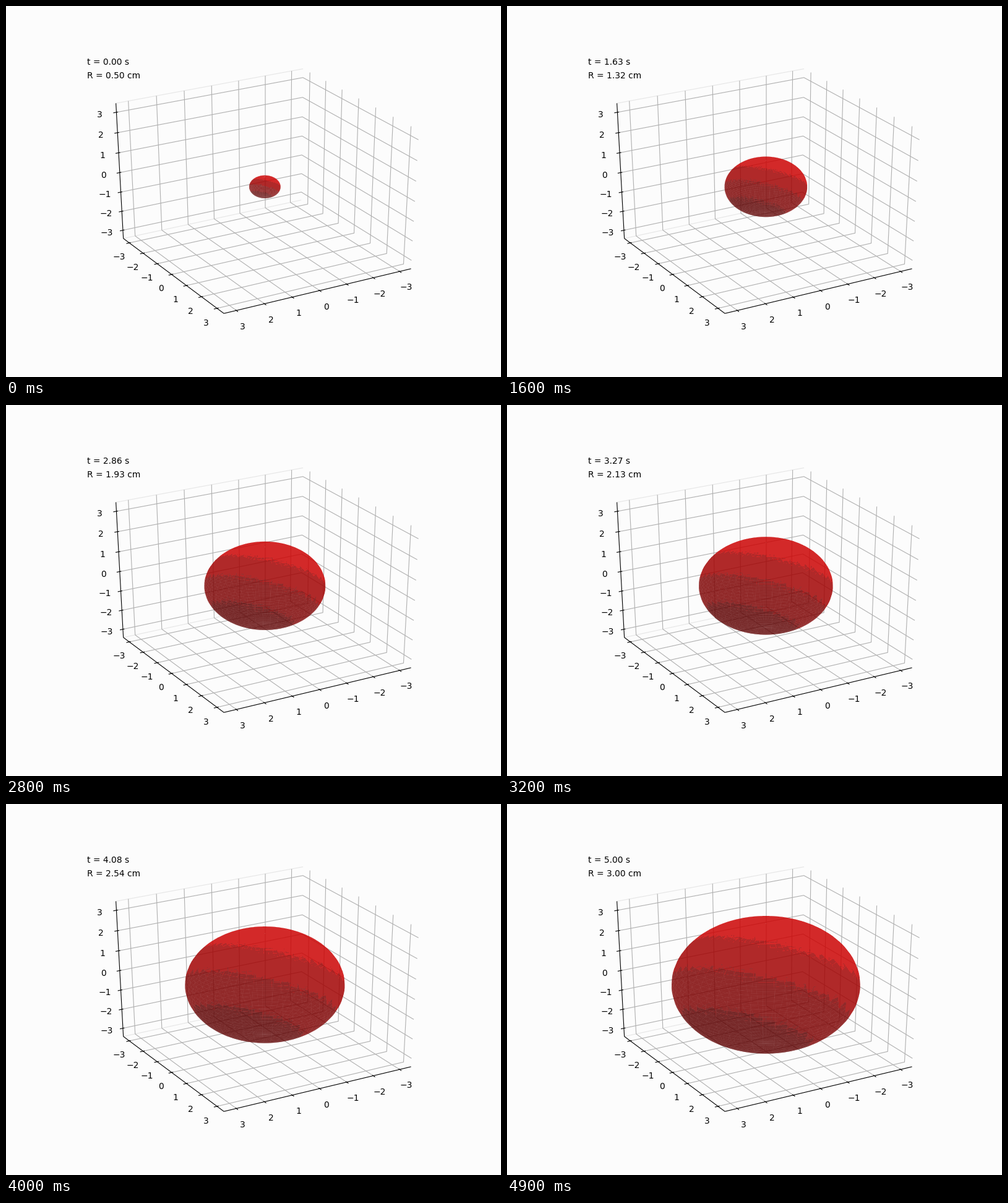
A matplotlib script that plays this animation: 800x600 px, repeating every 5 s.

```python
import numpy as np
import matplotlib.pyplot as plt
from matplotlib.animation import FuncAnimation
from matplotlib.collections import LineCollection, PolyCollection

WIDTH, HEIGHT, FRAMES = 800, 600, 50
LIMIT = 3.3                      # data range shown is -LIMIT..LIMIT
EDGE = LIMIT * (1 + 1 / 24)      # panes reach slightly past the range
TICK = 2 * LIMIT / 12
LABEL_GAP = 0.393
DISTANCE = 10
CENTER = np.array([418.38, 292.38])
SCALE = np.array([620, -453]) / 0.185
BACKGROUND = "#fcfcfc"

azim, elev = np.radians(60), np.radians(30)
RIGHT = np.array([-np.sin(azim), np.cos(azim), 0])
TOWARD = np.array([np.cos(azim) * np.cos(elev),
                   np.sin(azim) * np.cos(elev), np.sin(elev)])
UP = np.cross(TOWARD, RIGHT)
LIGHT = np.array([-2, -2, 1]) / 3


def project(points):
    """Perspective projection of data points to stage pixels, plus depth."""
    p = np.asarray(points, float) / (2 * LIMIT)
    depth = DISTANCE - p @ TOWARD
    flat = np.stack([p @ RIGHT, p @ UP], axis=-1) / depth[..., None]
    return CENTER + flat * SCALE, depth


def sphere_point(u, v):
    return np.stack([np.cos(u) * np.sin(v), np.sin(u) * np.sin(v),
                     np.cos(v) + 0 * u], axis=-1)


def band_shades(image, dpi):
    """Reduce the blended reds to four flat tones."""
    band = np.digitize(image[..., 0], [0.437, 0.587, 0.732])
    image[..., 0] = np.array([0.372, 0.492, 0.636, 0.802])[band]
    alpha = image[..., 3]
    alpha[(band >= 2) & (alpha > 0.7)] = 0.84
    return image, 0, 0


fig = plt.figure(figsize=(WIDTH / 100, HEIGHT / 100), dpi=100,
                 facecolor=BACKGROUND)
ax = fig.add_axes([0, 0, 1, 1])
ax.set(xlim=(0, WIDTH), ylim=(HEIGHT, 0))
ax.axis("off")


def add_lines(lines, color, order, width=0.8):
    ax.add_collection(LineCollection([project(line)[0] for line in lines],
                                     colors=color, linewidths=width,
                                     zorder=order), autolim=False)


def add_label(x, y, text="", va="top", ha="center"):
    return ax.text(x, y, text, va=va, ha=ha, fontsize=10,
                   family="DejaVu Sans", color="black", zorder=5)


E = EDGE
grid, marks = [], []
for n in range(-3, 4):
    grid += [[(n, -E, E), (n, -E, -E), (n, E, -E)],
             [(-E, n, E), (-E, n, -E), (E, n, -E)],
             [(E, -E, n), (-E, -E, n), (-E, E, n)]]
    outer, inner = E + 0.2 * TICK, E - 0.1 * TICK
    marks += [[(n, outer, -E), (n, inner, -E)],
              [(outer, n, -E), (inner, n, -E)],
              [(outer, -E, n), (inner, -E, n)]]
    far = E + LABEL_GAP
    for spot in [(n, far, -far), (far, n, -far), (far, -far, n)]:
        add_label(*project(spot)[0], str(n).replace("-", "\u2212"))

axis_lines = [[(-E, E, -E), (E, E, -E)],
              [(E, -E, -E), (E, E, -E)],
              [(E, -E, -E), (E, -E, E)]]
pane_edges = [[(E, -E, z), (-E, -E, z)] for z in (-E, E)]
add_lines(pane_edges, "#e6e6e6", 1)
add_lines(grid, "#b0b0b0", 2)
add_lines(axis_lines + marks, "black", 3)

# Unit sphere cut into 50 x 50 facets, lit from behind and above
steps = np.linspace(0, 1, 100)
steps = np.append(steps[::2], 1)
u, v = np.meshgrid(2 * np.pi * steps, np.pi * steps, indexing="ij")
nodes = sphere_point(u, v)
facets = np.stack([nodes[:-1, :-1], nodes[1:, :-1],
                   nodes[1:, 1:], nodes[:-1, 1:]], axis=2).reshape(-1, 4, 3)
middle = (steps[1:] + steps[:-1]) / 2
u, v = np.meshgrid(2 * np.pi * middle, np.pi * middle, indexing="ij")
normals = sphere_point(u, v).reshape(-1, 3)
colors = np.zeros((len(facets), 4))
colors[:, 0] = 0.65 + 0.35 * normals @ LIGHT
colors[:, 3] = 0.6

ball = PolyCollection([], edgecolors="none", linewidths=0, zorder=4)
ball.set_agg_filter(band_shades)
ax.add_collection(ball, autolim=False)
time_text = add_label(131, 94.65, va="baseline", ha="left")
radius_text = add_label(131, 117.3, va="baseline", ha="left")


def update(frame):
    t = 5 * frame / (FRAMES - 1)
    radius = 0.5 + 0.5 * t
    corners, depth = project(radius * facets)
    order = np.argsort(-depth.mean(axis=1))
    ball.set_verts(corners[order])
    ball.set_facecolor(colors[order])
    time_text.set_text(f"t = {t:.2f} s")
    radius_text.set_text(f"R = {radius:.2f} cm")
    return ball, time_text, radius_text


anim = FuncAnimation(fig, update, frames=FRAMES, interval=100,
                     init_func=lambda: update(0), repeat=True, repeat_delay=0)
plt.show()
```
